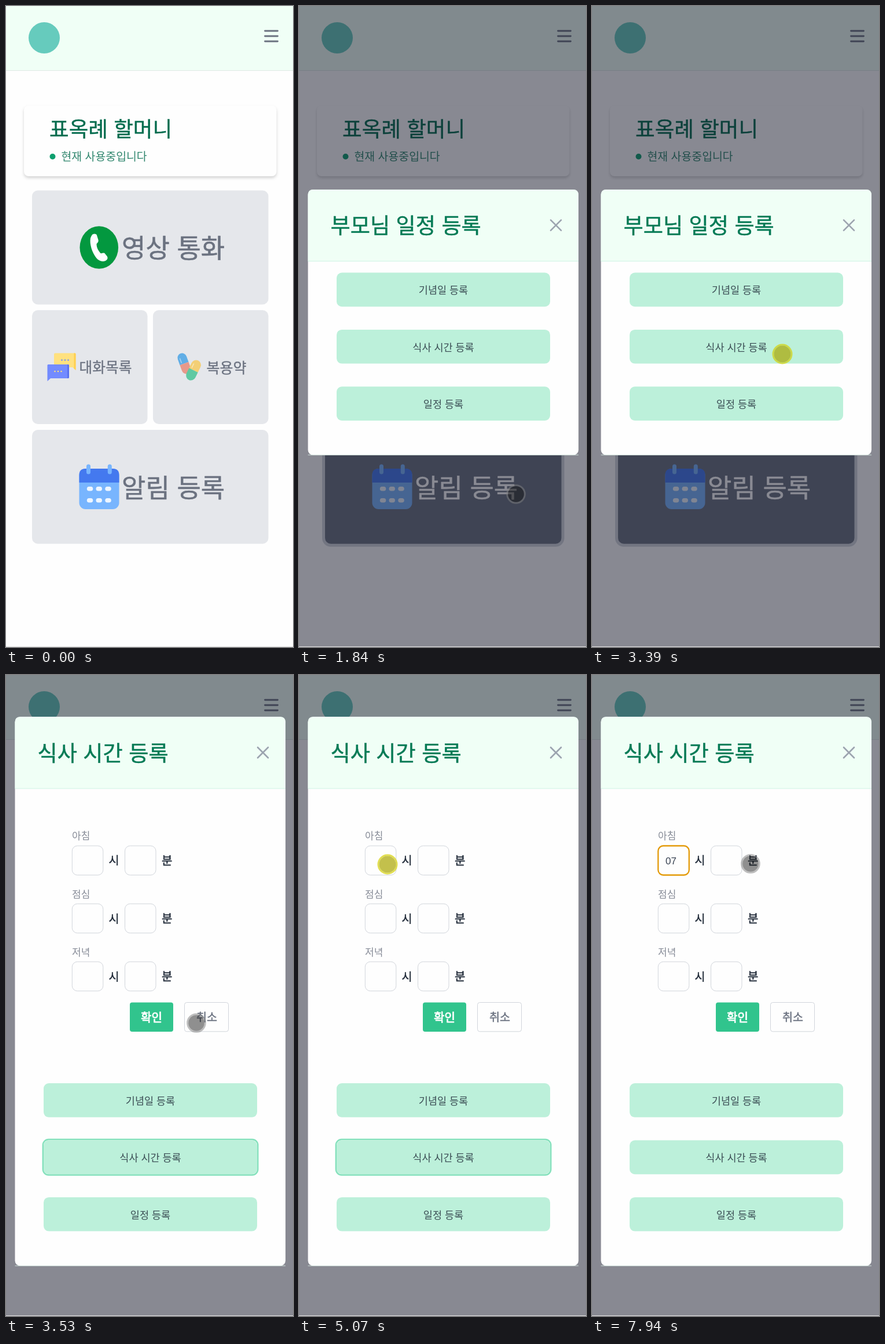
An HTML page that plays this animation: 496 px wide and 1107 px high, repeating every 8 s.

```html
<!DOCTYPE html>
<html lang="ko">
<head>
<meta charset="utf-8">
<style>
html, body { margin: 0; width: 100%; height: 100%; overflow: hidden; background: #fefefe; }
svg { display: block; width: 100%; height: 100%; }
text { font-family: "Noto Sans CJK KR", "Noto Sans CJK", sans-serif; stroke-linejoin: round; }
.thin { font-weight: 300; fill-opacity: .82; }
.num { font-family: "Liberation Sans", Arial, sans-serif; }
.card { filter: drop-shadow(0 3px 2.5px rgba(0, 0, 0, .17)); }
</style>
</head>
<body>
<svg id="stage" viewBox="0 0 496 1107"></svg>
<script>
const LOOP = 8000;
const GRAY = '#6b7280', LINE = '#d1d5db', INK = '#1f2937', MINT = '#bcf0da';

const rect = (x, y, w, h, r, fill, extra = '') =>
  `<rect x="${x}" y="${y}" width="${w}" height="${h}" rx="${r}" fill="${fill}" ${extra}/>`;
const circle = (x, y, r, fill) => `<circle cx="${x}" cy="${y}" r="${r}" fill="${fill}"/>`;
const path = (d, fill, extra = '') => `<path d="${d}" fill="${fill}" ${extra}/>`;
const stroke = (d, color, width) =>
  path(d, 'none', `stroke="${color}" stroke-width="${width}" stroke-linecap="round"`);
const group = (id, body, extra = '') => `<g id="${id}" ${extra}>${body}</g>`;

// y is the optical middle of the line; bold thickens the strokes
function text(x, y, size, str, fill, bold = 0, anchor = 'start') {
  const weight = bold ? `font-weight="400" stroke="${fill}" stroke-width="${bold}"` : 'class="thin"';
  return `<text x="${x}" y="${y + size * .38}" font-size="${size}" fill="${fill}" ${weight} text-anchor="${anchor}">${str}</text>`;
}

function phoneIcon() {
  return `<ellipse cx="160.8" cy="417" rx="33.3" ry="36.8" fill="#03983f"/>` +
    path('M149.5 394.5C152 393 156 393 157 396L159.5 404C160.3 408 157.5 409 156.5 411C156.5 418 160 423 163.5 427' +
      'C165.5 428 168 425.5 170.5 427L174.5 432C176.5 435 175.5 438 172 440C166 442.5 160 440 156 435' +
      'C149 426 144 411 146 401C147 398 148 396 149.5 394.5Z', '#fff');
}

function chatIcon() {
  const dots = (x, y, fill) => [0, 5.5, 11].map(d => circle(x + d, y, 1.3, fill)).join('');
  return path('M85 599.5H119Q120.5 599.5 120.5 601V629L115 624H83V601.5Q83 599.5 85 599.5Z', '#ffe17f') +
    path('M117.5 599.5H119Q120.5 599.5 120.5 601V629L117.5 626Z', '#ffcf4f') +
    dots(96.5, 611.5, '#6c8cff') +
    path('M73 619H107Q109 619 109 621V641Q109 643 107 643H77L71.5 648V620.5Q71.5 619 73 619Z', '#738bff') +
    path('M106 619H107Q109 619 109 621V641Q109 643 107 643H106Z', '#5a72ee') +
    dots(84.5, 631, '#ffe17f');
}

function capsule(x, y, angle, w, h, top, bottom) {
  const r = w / 2, s = h / 2 - r;
  const half = k => `M${-r} 0V${-k * s}A${r} ${r} 0 0 ${k > 0 ? 1 : 0} ${r} ${-k * s}V0Z`;
  return `<g transform="translate(${x} ${y}) rotate(${angle})">` +
    path(half(1), top) + path(half(-1), bottom) +
    stroke(`M${-r + 4} ${-s}V-3`, 'rgba(255,255,255,.45)', 1.6) + '</g>';
}

function calendarIcon() {
  let s = rect(126.5, 799, 69, 70, 11, '#78b5fe') +
    path('M126.5 823V810Q126.5 799 137.5 799H184.5Q195.5 799 195.5 810V823Z', '#4479ef') +
    rect(139, 791.5, 7, 17, 3.5, '#78b5fe') + rect(175.8, 791.5, 7, 17, 3.5, '#78b5fe');
  for (const y of [830, 850])
    for (const x of [139.8, 155.5, 171.3]) s += rect(x, y, 10.5, 7.6, 3.8, '#eef6ff');
  return s;
}

function home() {
  const tile = (x, y, w) => rect(x, y, w, 196.8, 10, '#e5e7eb');
  return rect(0, 0, 496, 1107, 0, '#fefefe') +
    rect(0, 0, 496, 111, 0, '#f0fff6') + rect(0, 111, 496, 1, 0, '#dfe9e5') +
    circle(66, 55, 27, '#66cbbd') +
    stroke('M447.5 43H469.5M447.5 52H469.5M447.5 61H469.5', GRAY, 2.8) +
    rect(31, 172, 436.5, 122, 8, '#fefefe', 'class="card"') +
    text(75, 212.5, 36.6, '표옥례 할머니', '#046c4e', .4) +
    circle(80.5, 260, 5, '#0e9f6e') +
    text(95.5, 260, 19.4, '현재 사용중입니다', '#046c4e') +
    tile(45, 318.6, 408.5) + phoneIcon() + text(200, 417.5, 45, '영상 통화', GRAY, .6) +
    tile(45, 525.2, 199.5) + chatIcon() + text(126.5, 624, 24.7, '대화목록', GRAY, .35) +
    tile(254, 525.2, 199.5) +
    capsule(308, 617.5, -20, 16, 37, '#61aee6', '#e8998b') +
    capsule(324, 629, 26, 17, 37, '#f3cf75', '#5fc9a2') +
    text(346.5, 624, 25, '복용약', GRAY, .35) +
    group('alarm', rect(45, 732, 408.5, 196.8, 10, '#e5e7eb', 'id="alarmTile"')) +
    calendarIcon() +
    group('alarmText', text(200, 832, 45, '알림 등록', 'currentColor', .6)) +
    rect(0, 1106, 496, 1, 0, '#e2e2e2');
}

function modal(top, bottom, title) {
  const mid = top + 61.7;
  return rect(15.5, top, 467.5, bottom - top, 9, '#fefefe') +
    rect(15.5, Math.floor(bottom) - .2, 467.5, 1, 0, '#cfe0da') +
    path(`M15.5 ${top + 123.5}V${top + 9}q0 -9 9 -9H474q9 0 9 9V${top + 123.5}Z`, '#f0fff6') +
    rect(15.5, top + 123.2, 467.5, 1, 0, '#cdf3e3') +
    text(54.5, mid + .5, 37.2, title, '#057a55', .5) +
    stroke(`M435 ${mid - 9}l18 18m0 -18l-18 18`, '#9ca3af', 2.6);
}

function menu(dy) {
  return ['기념일 등록', '식사 시간 등록', '일정 등록'].map((label, i) => {
    const y = 460.5 + dy + i * 98.4;
    return rect(65, y, 369, 58.7, 9, MINT) + text(249.5, y + 30, 17.5, label, INK, 0, 'middle');
  }).join('');
}

function mealForm() {
  const field = (x, y, id = '') => rect(x, y, 53.5, 50.5, 9, '#fefefe', `stroke="${LINE}" ${id}`);
  return ['아침', '점심', '저녁'].map((label, i) => {
    const y = 295 + i * 100.1;
    return text(114, y - 17, 17, label, GRAY) +
      field(114.3, y, i ? '' : 'id="hour"') + text(177.5, y + 25, 19.5, '시', INK, .5) +
      field(205.5, y) + text(269, y + 25, 20, '분', INK, .5);
  }).join('') +
    rect(214, 565.5, 75, 50.5, 4, '#31c48d') + text(251.5, 591, 20, '확인', '#fff', .8, 'middle') +
    rect(308.5, 565.5, 76, 50.3, 4, '#fefefe', `stroke="${LINE}"`) +
    text(347, 591, 19.6, '취소', GRAY, .5, 'middle') +
    '<text id="typed" class="num" x="127" y="327" font-size="17" fill="#374151"></text>' +
    rect(127, 308, 1.3, 24, 0, '#374151', 'id="caret"');
}

const $ = id => document.getElementById(id);

$('stage').innerHTML = home() +
  rect(0, 0, 496, 1106, 0, '#141728', 'id="shade" fill-opacity=".5"') +
  group('schedule', modal(317, 775.7, '부모님 일정 등록') + menu(0)) +
  group('meal', modal(72.3, 1020.5, '식사 시간 등록') + menu(244.6) +
    rect(63.8, 802, 371.5, 61.5, 10, 'none', 'id="ring" stroke="#84e1bc" stroke-width="2.4"') + mealForm()) +
  group('cursor', '<circle id="halo" fill="none" stroke-width="3"/><circle id="core"/>');

// Pointer moves: start, end, number of steps, way points [progress, x, y]
const MOVES = [
  [1110, 1440, 6, [[0, 458, 853], [.167, 444.5, 851.5], [1, 375, 843]]],
  [2630, 3130, 8, [[0, 375, 843], [.2, 372, 820], [.55, 360, 683], [.85, 334, 610], [1, 329, 601]]],
  [3930, 4680, 12, [[0, 329, 601], [.3, 318, 505], [.42, 297, 432], [.54, 263, 375], [.66, 230, 352], [1, 153, 327]]],
  [5410, 5760, 6, [[0, 153, 327], [1, 318, 338]]],
  [7880, 7940, 2, [[0, 318, 338], [1, 274, 326]]]
];
const PRESSES = [[1700, 1840], [3390, 3530], [5070, 5210]];
const CARET_ON = [[5140, 5690], [6210, 6690], [6890, 7680]];
const within = (spans, t) => spans.some(([a, b]) => t >= a && t < b);

function along(points, p) {
  let i = 1;
  while (i < points.length - 1 && points[i][0] < p) i++;
  const [p0, x0, y0] = points[i - 1], [p1, x1, y1] = points[i];
  const k = (p - p0) / (p1 - p0);
  return [x0 + (x1 - x0) * k, y0 + (y1 - y0) * k];
}

function pointer(t) {
  const move = MOVES.filter(m => t >= m[0]).pop();
  if (!move) return null;
  const [start, end, steps, points] = move;
  const step = Math.floor((t - start) / (end - start) * (steps - 1) + 1e-6) + 1;
  return along(points, Math.min(1, step / steps));
}

const show = (id, on) => $(id).setAttribute('visibility', on ? 'visible' : 'hidden');
function set(id, attrs) {
  for (const key in attrs) $(id).setAttribute(key, attrs[key]);
}

function render(t) {
  const opened = t >= 1840, meal = t >= 3530, focus = t >= 5140;
  show('shade', opened);
  show('schedule', opened && !meal);
  show('meal', meal);
  show('ring', meal && !focus);
  set('alarmTile', { fill: opened ? GRAY : '#e5e7eb' });
  set('alarm', { stroke: opened ? LINE : 'none', 'stroke-width': 10, 'paint-order': 'stroke' });
  set('alarmText', { color: opened ? '#fff' : GRAY });

  set('hour', { stroke: focus ? '#e39a08' : LINE, 'stroke-width': focus ? 2.3 : 1 });
  const typed = t >= 7150 ? '07' : t >= 6890 ? '0' : '';
  $('typed').textContent = typed;
  set('caret', { x: 127.2 + typed.length * 9.2 });
  show('caret', meal && within(CARET_ON, t));
  show('typed', meal);

  const at = pointer(t), pressed = within(PRESSES, t);
  show('cursor', at);
  if (at) set('cursor', { transform: `translate(${at[0]} ${at[1]})` });
  set('halo', { r: pressed ? 16 : 15.3, stroke: pressed ? 'rgba(212,208,0,.68)' : 'rgba(128,128,128,.5)' });
  set('core', { r: pressed ? 14.5 : 13.8, fill: pressed ? 'rgba(170,165,0,.7)' : 'rgba(20,20,20,.47)' });
}

function frame() {
  render(performance.now() % LOOP);
  requestAnimationFrame(frame);
}
frame();
</script>
</body>
</html>
```
